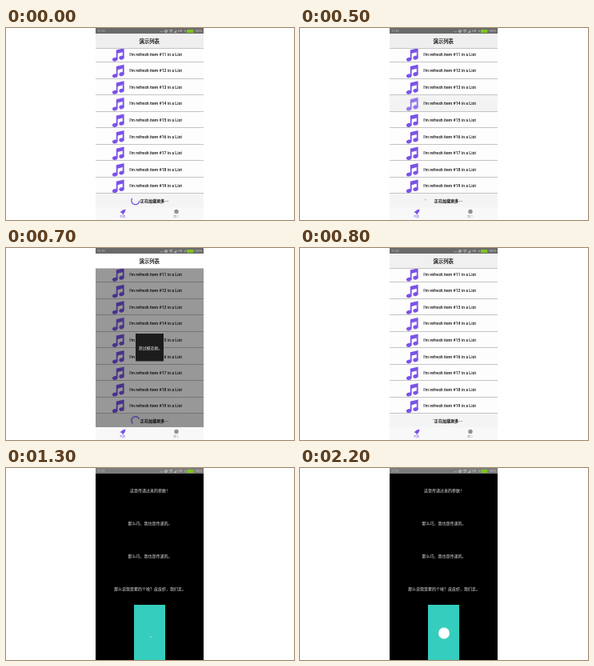
Write an HTML page that moves like this. It is 360x240 px and loops after 2400 ms.

```html
<!DOCTYPE html>
<html lang="en">
<head>
<meta charset="utf-8">
<title>List demo</title>
<style>
  html, body { margin: 0; width: 100%; height: 100%; overflow: hidden; background: #fff; }
  svg { display: block; width: 360px; height: 240px; }
  text { font-family: "Noto Sans CJK SC", "Noto Sans CJK", sans-serif; text-anchor: middle; }
  .latin { font-family: Roboto, "Open Sans", sans-serif; text-anchor: start; }
  .item { font-size: 5.17px; font-weight: 500; fill: #111; }
  .status { font-size: 4px; fill: #c8c8c8; }
  .strong { fill: #111; stroke: #111; stroke-width: .2px; }
  .note, .rocket { fill: #7b52e8; }
  .rule { fill: #c4c4c4; }

  .list, .modal, .press, .pressed, .dark, .bar, .header, .spin, .mark {
    animation: 2400ms step-end infinite;
  }
  .list { animation-name: list; }
  .modal { animation-name: modal; }
  .press { animation-name: press; }
  .pressed { animation-name: fade; }
  .dark { animation-name: dark; }
  .bar { animation-name: bar; }
  .header { animation-name: header; }
  .spin { animation-name: spin; transform-origin: 161.8px 215.7px; }
  .mark { animation-name: grow; animation-timing-function: steps(5); }

  @keyframes list { 0% { visibility: visible } 41.66%, 100% { visibility: hidden } }
  @keyframes modal { 0% { visibility: hidden } 25% { visibility: visible } 33.33%, 100% { visibility: hidden } }
  @keyframes press { 0% { fill: transparent } 20.83% { fill: #f3f3f3 } 25%, 100% { fill: transparent } }
  @keyframes fade { 0% { opacity: 1 } 20.83% { opacity: .8 } 25%, 100% { opacity: 1 } }
  @keyframes dark { 0% { visibility: hidden } 54.16%, 100% { visibility: visible } }
  @keyframes bar { 0% { fill: #6a6a6a } 41.66% { fill: #656565 } 54.16%, 100% { fill: #7c7c7c } }
  @keyframes header { 0% { fill: #efefef } 25% { fill: #fff } 33.33%, 100% { fill: #f0f0f0 } }
  @keyframes spin {
    0% { transform: rotate(0deg); stroke-dasharray: 215 360 }
    4.16% { transform: rotate(70deg); stroke-dasharray: 225 360 }
    8.33% { transform: rotate(150deg); stroke-dasharray: 180 360 }
    12.5% { transform: rotate(260deg); stroke-dasharray: 120 360 }
    16.66% { transform: rotate(80deg); stroke-dasharray: 60 360 }
    20.83% { transform: rotate(186deg); stroke-dasharray: 12 360 }
    25% { transform: rotate(40deg); stroke-dasharray: 180 360 }
    29.16% { transform: rotate(130deg); stroke-dasharray: 210 360 }
    33.33% { transform: rotate(340deg); stroke-dasharray: 12 360 }
    37.5%, 100% { transform: rotate(355deg); stroke-dasharray: 120 360 }
  }
  @keyframes grow {
    0%, 54.16% { transform: translate(181px, 211px) scale(.1) }
    75%, 100% { transform: translate(180px, 206.5px) scale(1) }
  }
</style>
</head>
<body>
<svg viewBox="0 0 360 240">
  <defs>
    <g id="note">
      <path d="M137.8-5.6 147.6-7.8V4H145.8V-2.8L139.6-1.2V6.2H137.8Z"/>
      <ellipse cx="136.2" cy="6.2" rx="3.3" ry="2.4" transform="rotate(-15 136.2 6.2)"/>
      <ellipse cx="144.5" cy="4.1" rx="3.2" ry="2.4" transform="rotate(-15 144.5 4.1)"/>
    </g>
  </defs>

  <rect x="112" width="135" height="240" fill="#fafafa"/>

  <g class="list">
    <rect x="112" y="25" width="135" height="182" fill="#fdfdfd"/>
    <rect x="112" y="207" width="135" height="17" fill="#f4f4f4"/>
    <g id="rows"></g>
    <circle class="spin" cx="161.8" cy="215.7" r="5" pathLength="360" fill="none" stroke="#7b52e8" stroke-width="1.3"/>
    <text class="strong" x="185.7" y="218" font-size="5.1">正在加载更多…</text>
  </g>

  <g class="modal">
    <rect x="112" y="25" width="135" height="199" fill="#000" fill-opacity=".4"/>
    <rect x="162" y="107" width="35" height="34.5" fill="#1c1c1c"/>
    <text x="180.5" y="126.5" font-size="5" fill="#e4e4e4">测试模态框。</text>
  </g>

  <g class="list">
    <rect class="header" x="112" y="7" width="135" height="18"/>
    <rect class="rule" x="112" y="25" width="135" height="1"/>
    <text class="strong" x="179.2" y="19" font-size="6.3">演示列表</text>
    <rect x="112" y="224" width="135" height="16" fill="#f8f8f8"/>
    <path class="rocket" d="M149.6 226.5Q145.5 227 143.8 229.2L142.4 230.2 144.3 230.9 145.2 231.8 146 233.7 147 232.3Q149.2 230.5 149.6 226.5Z"/>
    <text x="145.8" y="237" font-size="3.6" fill="#7b52e8">列表</text>
    <circle cx="213" cy="229.5" r="2.7" fill="#929292"/>
    <text x="212.8" y="237" font-size="3.6" fill="#929292">第二</text>
  </g>

  <g class="dark">
    <rect x="112" y="7" width="135" height="233"/>
    <g font-size="5" fill="#e6e6e6">
      <text x="180" y="30">这是传递过来的参数！</text>
      <text x="180" y="71">那么巧，我也是传递的。</text>
      <text x="180" y="112">那么巧，我也是传递的。</text>
      <text x="180" y="152.8">那么说我是累的个啥？皮皮虾，我们走。</text>
    </g>
    <rect x="160" y="171" width="39" height="69" fill="#35cdbd"/>
    <circle class="mark" r="7" fill="#fff"/>
  </g>

  <rect class="bar" x="112" width="135" height="7"/>
  <text class="latin status" x="114" y="5.4">11:51</text>
  <g fill="none" stroke="#c8c8c8" stroke-width=".8">
    <path d="M192.5 4.7H196.5" stroke-dasharray="1 .6"/>
    <circle cx="200" cy="4" r="1.6"/>
    <path d="M199 5 201 3"/>
    <path d="M203.8 3.2Q206.2 1.4 208.6 3.2M204.9 4.4Q206.2 3.4 207.5 4.4M206.2 5V6"/>
    <path d="M210.3 6V5M211.5 6V4M212.7 6V2.6"/>
  </g>
  <text class="latin status" x="215" y="5.4">HD</text>
  <path d="M224.4 1.8 223 4.2H224L223.4 6.2 225 3.6H224Z" fill="#c8c8c8"/>
  <rect x="226" y="2" width="8.4" height="4" rx=".6" fill="#7fc41c"/>
  <text class="latin status" x="235.8" y="5.4">100%</text>
</svg>
<script>
  const PITCH = 20.55, FIRST = 11, COUNT = 9, PRESSED = 3;
  const line = i => Math.round(42 + PITCH * i);
  document.getElementById('rows').innerHTML = Array.from({ length: COUNT }, (_, i) => {
    const mid = 33 + PITCH * i;
    const hit = i === PRESSED;
    return (hit ? `<rect class="press" x="112" y="${line(i - 1) + 1}" width="135" height="20"/>` : '') +
      `<use class="note ${hit ? 'pressed' : ''}" href="#note" y="${mid}"/>` +
      `<text class="latin item" x="154.2" y="${mid + 1.8}">I'm refresh item #${FIRST + i} in a List</text>` +
      `<rect class="rule" x="112" y="${line(i)}" width="135" height="1"/>`;
  }).join('');
</script>
</body>
</html>
```
